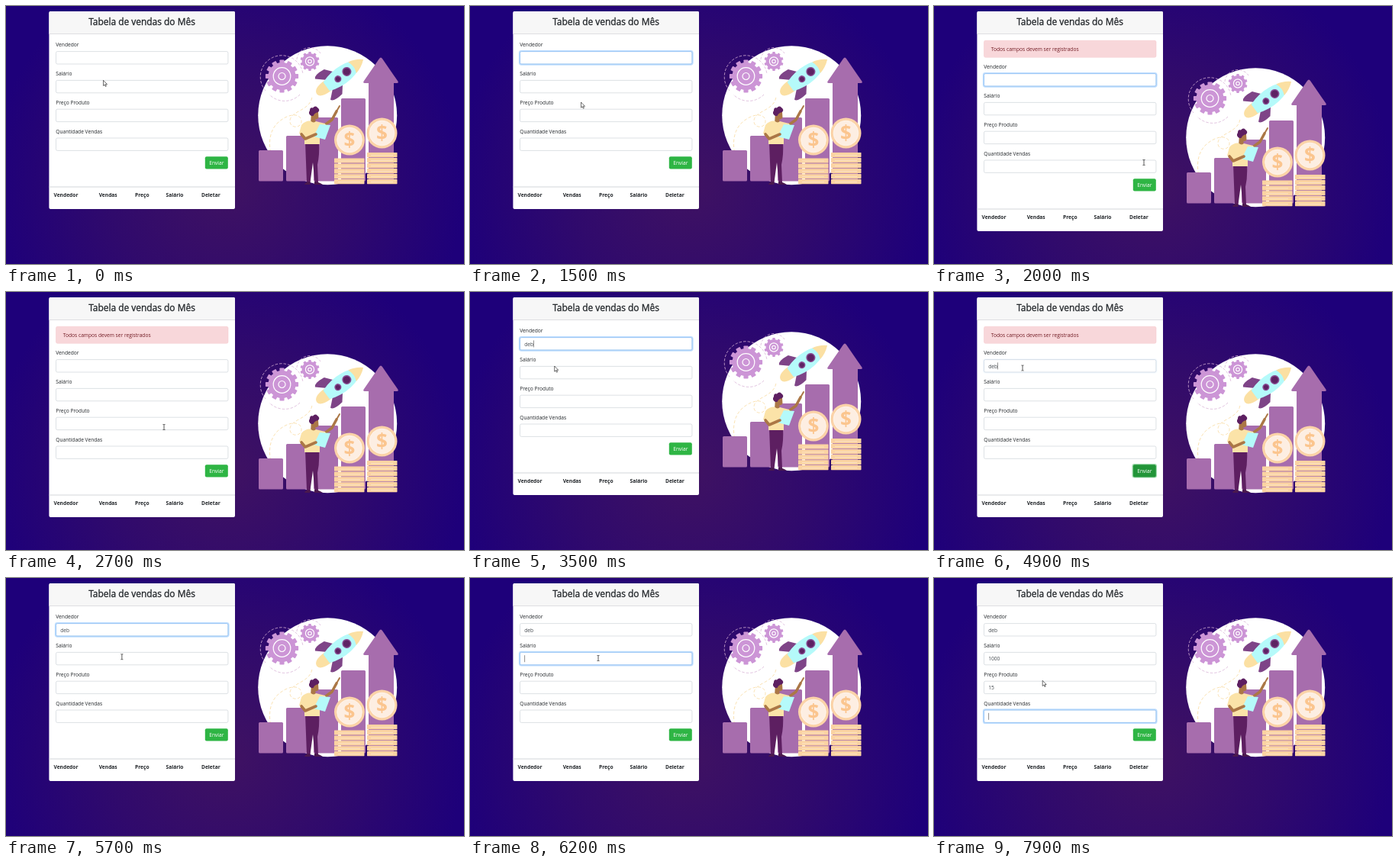
These frames come from a looping animation (600 px wide and 338 px high, 8 s). An HTML page:

```html
<!DOCTYPE html>
<html lang="pt">
<head>
<meta charset="utf-8">
<title>Tabela de vendas</title>
<style>
html, body { margin: 0; width: 100%; height: 100%; overflow: hidden; background: #1e007a; }
svg { display: block; width: 600px; height: 338px; }
text { font: 6.65px "Open Sans", "Noto Sans", sans-serif; fill: #212529; }
.title { font-size: 11.95px; text-anchor: middle; stroke: #212529; stroke-width: .3; }
.head { font-weight: 700; }
.value { fill: #41474d; }
.dollar { font: 700 26px "Open Sans", sans-serif; fill: #fbc58e; text-anchor: middle; }
.dash { fill: none; stroke: #fbe3b4; stroke-width: 1; stroke-dasharray: 4 2.5; }
.orbit { fill: none; stroke: #d9b3d6; stroke-width: .8; stroke-dasharray: 3.5 2; }
.bar { fill: #a76dad; }
.limb { fill: none; stroke: #ab7746; stroke-width: 3.6; stroke-linecap: round; stroke-linejoin: round; }
</style>
</head>
<body>
<svg id="stage" viewBox="0 0 600 338">
  <defs>
    <radialGradient id="sky" gradientUnits="userSpaceOnUse" cx="290" cy="235" r="310">
      <stop offset="0" stop-color="#3f1262"/>
      <stop offset=".5" stop-color="#300a6c"/>
      <stop offset="1" stop-color="#1e007a"/>
    </radialGradient>
  </defs>
  <rect width="600" height="338" fill="url(#sky)"/>

  <g id="art">
    <circle cx="421.2" cy="143.3" r="91" fill="#fff"/>
    <path class="dash" d="M357 215C343 197 341 168 355 154C368 141 385 139 387 150C388 161 371 161 372 150C373 137 400 137 401 118"/>
    <path class="orbit" d="M340 111A28 28 0 1 1 389 89M385 116A28 28 0 0 1 345 116M381 70A17 17 0 0 1 412 62"/>
    <g id="gears"></g>
    <g id="bars"></g>
    <path class="bar" d="M475 229V101H470Q467 101 469 98L489 69Q491 66 493 69L513 98Q515 101 512 101H508V229Z"/>

    <g transform="translate(437.5 92.500) rotate(-36.400)">
      <path fill="#fbe0a3" d="M-20 -8Q-38 -8 -38 1Q-37 8 -20 8Z"/>
      <g id="fins" fill="#7e4487">
        <path d="M-3 -10L-11 -20Q-26 -22 -28 -17L-18 -8Z"/>
        <path d="M-3 10L-11 20Q-26 22 -28 17L-18 8Z"/>
      </g>
      <path fill="#b5fafa" d="M-22 -7Q-6 -13 10 -11Q26 -9 37 0Q26 9 10 11Q-6 13 -22 7Z"/>
      <path fill="#fbe0a3" d="M20 -9Q30 -7 38 0Q30 7 20 9Q24 0 20 -9Z"/>
      <g fill="#5d2363" stroke="#8a4d93" stroke-width="1.500">
        <circle cx="-4" cy="1" r="3.800"/><circle cx="11" r="5.300"/>
      </g>
    </g>

    <g id="man">
      <path fill="#5d1f61" d="M392 178H410Q411 195 408 208L409 231H404.500L402 205L398.500 231H394Z"/>
      <path fill="#4a194d" d="M391 234Q392 230 398.500 230V234ZM404 234V230Q409 230 415 234Z"/>
      <path class="limb" d="M416 157L427 149L433 138"/>
      <path d="M433 138L437 131" stroke="#ab7746" stroke-width="2" stroke-linecap="round"/>
      <path fill="#ab7746" d="M400 139H409L409.500 146Q408 149 405.500 148V154H399Z"/>
      <path fill="#5d1f61" d="M400 144Q395 141 398 137Q398 132 402 133.500Q405 130 408 133Q412 136 409 139Q404 140 402.500 144Z"/>
      <path fill="#fbe3a8" d="M387 156Q392 150 399 150.500Q403 154 406 151L418 154L421 160L411 163L411 181H391L391 170L384 167Z"/>
      <path fill="#b5fafa" d="M411 155L425 156L418 175L403 171Z"/>
      <path class="limb" d="M387 168L392 174L406 168"/>
    </g>
    <g id="coins"></g>
  </g>

  <rect id="panel" x="56.400" y="7" width="243.600" rx="2" fill="#fff"/>
  <path d="M56.400 36.500V9Q56.400 7 58.400 7H298Q300 7 300 9V36.500Z" fill="#f7f7f7"/>
  <path d="M56.400 36.500H300" stroke="#d9d9dc" stroke-width=".8"/>
  <text class="title" x="178" y="24.700">Tabela de vendas do Mês</text>
  <g id="alert">
    <rect x="65.500" y="45.300" width="225.500" height="22" rx="2" fill="#f8d7da" stroke="#f5c6cb" stroke-width=".5"/>
    <text x="74.800" y="58.800" style="fill:#721c24">Todos campos devem ser registrados</text>
  </g>
  <g id="form">
    <g id="button">
      <rect id="buttonRing" x="259.500" y="196" width="32.500" height="18.500" rx="3" fill="#93d6a2"/>
      <rect id="buttonFace" x="260.800" y="197.200" width="30" height="16.200" rx="2"/>
      <text x="275.800" y="207.700" text-anchor="middle" style="fill:#fff">Enviar</text>
    </g>
    <path d="M56.400 237H300" stroke="#cfd2d6" stroke-width=".9"/>
    <g id="heads"></g>
  </g>
  <path id="caret" stroke="#444" stroke-width=".6"/>
  <g id="cursor">
    <path id="arrow" d="M0 0V7.200L1.700 5.700L2.800 8.200L3.900 7.700L2.800 5.300H5Z" fill="#fff" stroke="#222" stroke-width=".65"/>
    <path id="beam" d="M-1.500 -3.500H-.4L0 -3L.4 -3.500H1.500M0 -3V3M-1.500 3.500H-.4L0 3L.4 3.500H1.500" fill="none" stroke="#222" stroke-width=".75"/>
    <path id="hand" d="M-.8 0Q0 -1 .8 0V3L3.500 3.800V6L2.700 8.500H-1L-3 5.200L-2 4.500L-.8 5.500Z" fill="#fff" stroke="#222" stroke-width=".6"/>
  </g>
</svg>
<script>
const $ = id => document.getElementById(id);
const LOOP = 8000, SHIFT = 29, FADE = 150, ALERT_TIME = 1300;

function add(parent, tag, attrs, text) {
  const el = document.createElementNS('http://www.w3.org/2000/svg', tag);
  for (const key in attrs) el.setAttribute(key, attrs[key]);
  if (text) el.textContent = text;
  parent.appendChild(el);
  return el;
}

function gear(cx, cy, r, teeth, hole) {
  const g = add($('gears'), 'g', { transform: `translate(${cx} ${cy})`, fill: '#cc95d6' });
  for (let i = 0; i < teeth; i++)
    add(g, 'rect', { x: -r * .17, y: -r * 1.2, width: r * .34, height: r * .4, rx: .8, transform: `rotate(${i * 360 / teeth})` });
  add(g, 'circle', { r });
  const ring = { fill: 'none', stroke: '#fff', 'stroke-width': 1.2 };
  add(g, 'circle', { r: hole, ...ring });
  add(g, 'circle', { r: hole * .4, ...ring });
}

function coin(cx, cy, left, top, rows) {
  const g = $('coins'), pitch = (234 - top) / rows;
  for (let i = 0; i < rows; i++) {
    const y = top + i * pitch;
    add(g, 'rect', { x: left, y, width: 39.5, height: pitch - .8, rx: .6, fill: '#fbd3a2' });
    add(g, 'path', { d: `M${left + 5} ${y + pitch / 2}h29`, stroke: '#fce2c3', 'stroke-width': 1 });
  }
  add(g, 'circle', { cx, cy, r: 20, fill: '#fbd3a8' });
  add(g, 'circle', { cx, cy, r: 16.3, fill: '#fdeee2', stroke: '#fff5ec', 'stroke-width': 1 });
  add(g, 'text', { x: cx, y: cy + 9.3, class: 'dollar' }, '$');
}

gear(361.5, 92, 18, 12, 11.3);
gear(398, 72.5, 10.5, 10, 5.6);
[189, 170, 146, 121].forEach((y, i) =>
  add($('bars'), 'rect', { class: 'bar', x: 331 + 36 * i, y, width: 32, height: 229.5 - y, rx: 1.5 }));
coin(450, 175.5, 430, 199.5, 5);
coin(492.5, 166.5, 473, 192, 6);

[['Vendedor', 62.5], ['Vendas', 121.7], ['Preço', 169], ['Salário', 209.5], ['Deletar', 256]].forEach(([name, x]) =>
  add($('heads'), 'text', { class: 'head', x, y: 250.3 }, name));

const fields = ['Vendedor', 'Salário', 'Preço Produto', 'Quantidade Vendas'].map((name, i) => {
  const y = 59.6 + 37.8 * i, form = $('form');
  const box = { x: 65.5, y, width: 225.4, height: 16.4, rx: 1.8 };
  add(form, 'text', { x: 65.3, y: y - 6.4 }, name);
  const ring = add(form, 'rect', { x: 64.6, y: y - .9, width: 227.2, height: 18.2, rx: 2.6, fill: 'none', stroke: '#bfdeff', 'stroke-width': 1.6 });
  add(form, 'rect', { ...box, fill: '#fff', stroke: '#ced4da', 'stroke-width': .7 });
  const edge = add(form, 'rect', { ...box, fill: 'none', stroke: '#80bdff', 'stroke-width': .7 });
  const value = add(form, 'text', { class: 'value', x: 71.2, y: y + 11 });
  return { y, ring, edge, value };
});

const BUTTON = 4;
const focusSpans = [
  [1000, 2000, 0], [2000, 2450, BUTTON], [2950, 4300, 0], [4300, 4880, BUTTON],
  [4880, 5900, 0], [5900, 7050, 1], [7050, 7700, 2], [7700, 9000, 3]
];
const alertStarts = [2000, 4300];
const typing = [
  ['deb', [3180, 3290, 3400]],
  ['1000', [6320, 6420, 6500, 6600]],
  ['15', [7320, 7420]],
  ['', []]
];
const pointerPath = [
  [0, 127.5, 97.3], [100, 127.5, 97.3], [700, 124, 68], [1050, 125, 68], [1500, 145.5, 126],
  [1900, 275, 205], [2100, 275, 205], [2700, 207, 177], [2950, 110.7, 97], [3600, 110.7, 97],
  [4200, 276, 206], [4400, 276, 206], [4850, 116, 99.5], [5450, 117, 99.5], [5850, 168, 105],
  [6700, 168, 105], [7000, 142.2, 138], [7150, 142.2, 138], [7400, 142.2, 134.3], [8000, 142.2, 134.3]
];

const clamp = v => Math.max(0, Math.min(1, v));
const ease = v => v * v * (3 - 2 * v);

function focusLevel(t, target) {
  return focusSpans.reduce((level, [from, to, which]) => {
    if (which !== target || t < from) return level;
    return Math.max(level, t < to ? clamp((t - from) / FADE) : 1 - clamp((t - to) / FADE));
  }, 0);
}

function pointerAt(t) {
  const i = pointerPath.findIndex(k => k[0] > t);
  const [t0, x0, y0] = pointerPath[i - 1], [t1, x1, y1] = pointerPath[i];
  const k = ease((t - t0) / (t1 - t0));
  return [x0 + (x1 - x0) * k, y0 + (y1 - y0) * k];
}

const show = (el, on) => el.setAttribute('visibility', on ? 'visible' : 'hidden');
const move = (el, x, y) => el.setAttribute('transform', `translate(${x} ${y})`);

function drawCaret(t, shift) {
  const span = focusSpans.find(([from, to]) => t >= from && t < to);
  const field = span && fields[span[2]];
  show($('caret'), false);
  if (!field) return;
  const last = Math.max(span[0], ...typing[span[2]][1].filter(k => k <= t));
  const x = 71.6 + (field.value.textContent ? field.value.getComputedTextLength() : 0);
  $('caret').setAttribute('d', `M${x} ${field.y + shift + 3.8}v9`);
  show($('caret'), (t - last) % 1000 < 490);
}

function drawPointer(t, shift) {
  const [x, y] = pointerAt(t);
  const overField = x > 65 && x < 291 && fields.some(f => y > f.y + shift && y < f.y + shift + 16.4);
  const overButton = x > 261 && x < 291 && y > 197 + shift && y < 213.5 + shift;
  move($('cursor'), x, y);
  show($('beam'), overField);
  show($('hand'), overButton);
  show($('arrow'), !overField && !overButton);
}

function render(t) {
  const alerting = alertStarts.some(from => t >= from && t < from + ALERT_TIME);
  const shift = alerting ? SHIFT : 0;
  show($('alert'), alerting);
  move($('form'), 0, shift);
  move($('art'), 0, shift);
  $('panel').setAttribute('height', 259 + shift);

  fields.forEach((field, i) => {
    const [text, keys] = typing[i], level = focusLevel(t, i);
    field.value.textContent = text.slice(0, keys.filter(k => k <= t).length);
    field.ring.setAttribute('opacity', level);
    field.edge.setAttribute('opacity', level);
  });
  const pressed = focusLevel(t, BUTTON);
  $('buttonRing').setAttribute('opacity', pressed);
  $('buttonFace').setAttribute('fill', `rgb(${46 - 14 * pressed},${181 - 37 * pressed},${68 - 14 * pressed})`);
  drawCaret(t, shift);
  drawPointer(t, shift);
}

const start = performance.now();
function tick() {
  const t = (performance.now() - start) % LOOP;
  render(Math.floor(t / 100) * 100);
  requestAnimationFrame(tick);
}
tick();
</script>
</body>
</html>
```
